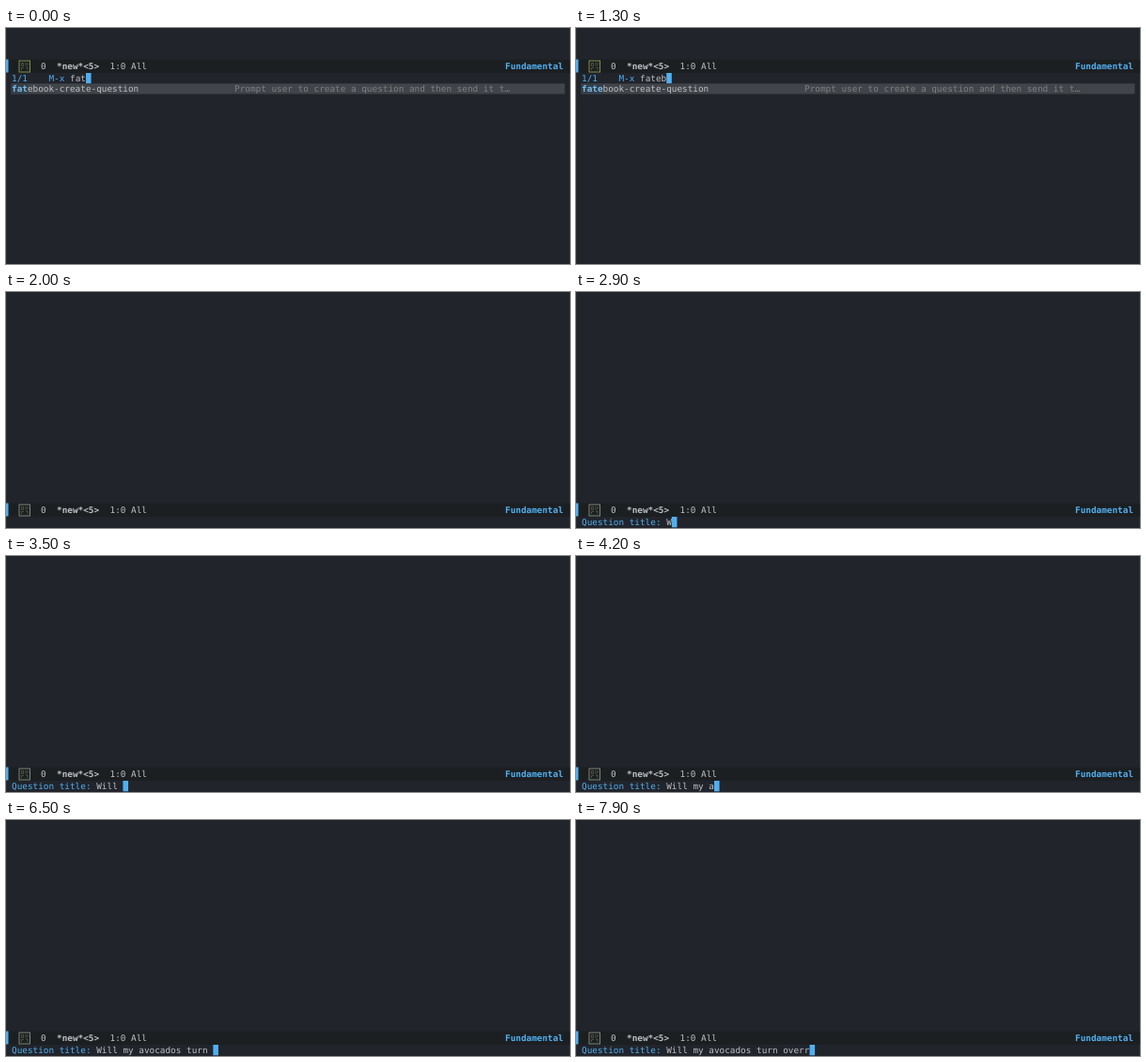
These frames come from a looping animation (600x252 px, 8000 ms). An HTML page:

```html
<!DOCTYPE html>
<html lang="en">
<head>
<meta charset="utf-8">
<title>Minibuffer prompt</title>
<style>
html, body { margin: 0; width: 100%; height: 100%; overflow: hidden; background: #21242b; }
svg { display: block; }
text {
  font: 9.37px "DejaVu Sans Mono", monospace;
  fill: #bbc0c4;
  white-space: pre;
  text-rendering: geometricPrecision;
}
.blue { fill: #51afef; }
.bold { font-weight: bold; }
.match { fill: #7bb9e6; font-weight: bold; }
.note { fill: #7d8084; }
</style>
</head>
<body>
<svg width="600" height="252" viewBox="0 0 600 252">
  <rect width="600" height="252" fill="#21242b"/>
  <path d="M.5 0V252M599.5 0V252" stroke="#292c30"/>
  <g id="panel">
    <rect y="33.5" width="600" height="14.5" fill="#1c1f22"/>
    <rect y="33.5" width="2.5" height="14" class="blue"/>
    <rect id="icon" x="14" y="35" width="11.5" height="12" fill="none"/>
    <path d="M16.5 37.5h2v3h-2zM21 37v3.5M23 37v3M16.5 42.5h2.5M16.5 42.5v2.5M21 42h2v3" fill="none" stroke="#62694f" stroke-width=".7"/>
    <text x="37" y="44">0</text>
    <text x="54" y="44" class="bold">*new*&lt;5&gt;</text>
    <text x="110.5" y="44">1:0 All</text>
    <text x="531" y="44" class="blue bold">Fundamental</text>
    <rect id="cursor" y="48" width="5.6" height="11.3" class="blue"/>
    <text id="prompt" x="6" y="57" class="blue"></text>
    <text id="input" y="57"></text>
  </g>
  <g id="list">
    <rect x="5.5" y="59.3" width="589" height="11.2" fill="#414448"/>
    <rect id="tint" x="5.5" y="59.3" height="11.2" fill="#33404b"/>
    <text x="6" y="68"><tspan id="hit" class="match"></tspan><tspan id="rest"></tspan></text>
    <text x="243" y="68" class="note">Prompt user to create a question and then send it t…</text>
  </g>
</svg>
<script>
const $ = id => document.getElementById(id);
const CELL = 5.64, LEFT = 6, LOOP = 8000;
const command = "fatebook-create-question";
const title = "Will my avocados turn overr";

// Times in units of 100 ms at which characters or highlights appear.
const commandKeys = [10, 13, 15, 17, 18];
const matchKeys = [11, 14, 16, 18, 19];
const titleKeys = [29, 31, 33, 34, 35, 37, 38, 39, 42, 43, 45, 49, 51, 53,
  54, 55, 56, 59, 61, 62, 63, 65, 73, 75, 76, 77, 79];
const CLOSE = 20, ASK = 21;

const count = (keys, tick) => keys.filter(k => k <= tick).length;

function show(prompt, text) {
  const x = LEFT + prompt.length * CELL;
  $("prompt").textContent = prompt;
  $("input").textContent = text;
  $("input").setAttribute("x", x);
  $("cursor").setAttribute("x", x + text.length * CELL);
}

function draw(tick) {
  const choosing = tick < CLOSE;
  $("panel").setAttribute("transform", `translate(0 ${choosing ? 0 : 192})`);
  $("list").style.display = choosing ? "" : "none";
  $("icon").setAttribute("stroke", choosing ? "#7d8f4e" : "#7c8478");
  $("cursor").style.display = tick === CLOSE ? "none" : "";

  if (choosing) {
    const hits = 3 + count(matchKeys, tick);
    show("1/1    M-x ", command.slice(0, 3 + count(commandKeys, tick)));
    $("hit").textContent = command.slice(0, hits);
    $("rest").textContent = command.slice(hits);
    $("tint").setAttribute("width", hits * CELL + .5);
  } else if (tick < ASK) {
    show("", "");
  } else {
    show("Question title: ", title.slice(0, count(titleKeys, tick)));
  }
}

const start = performance.now();
let last = -1;
function frame() {
  const tick = Math.floor((performance.now() - start) % LOOP / 100);
  if (tick !== last) draw(last = tick);
  requestAnimationFrame(frame);
}
frame();
</script>
</body>
</html>
```
